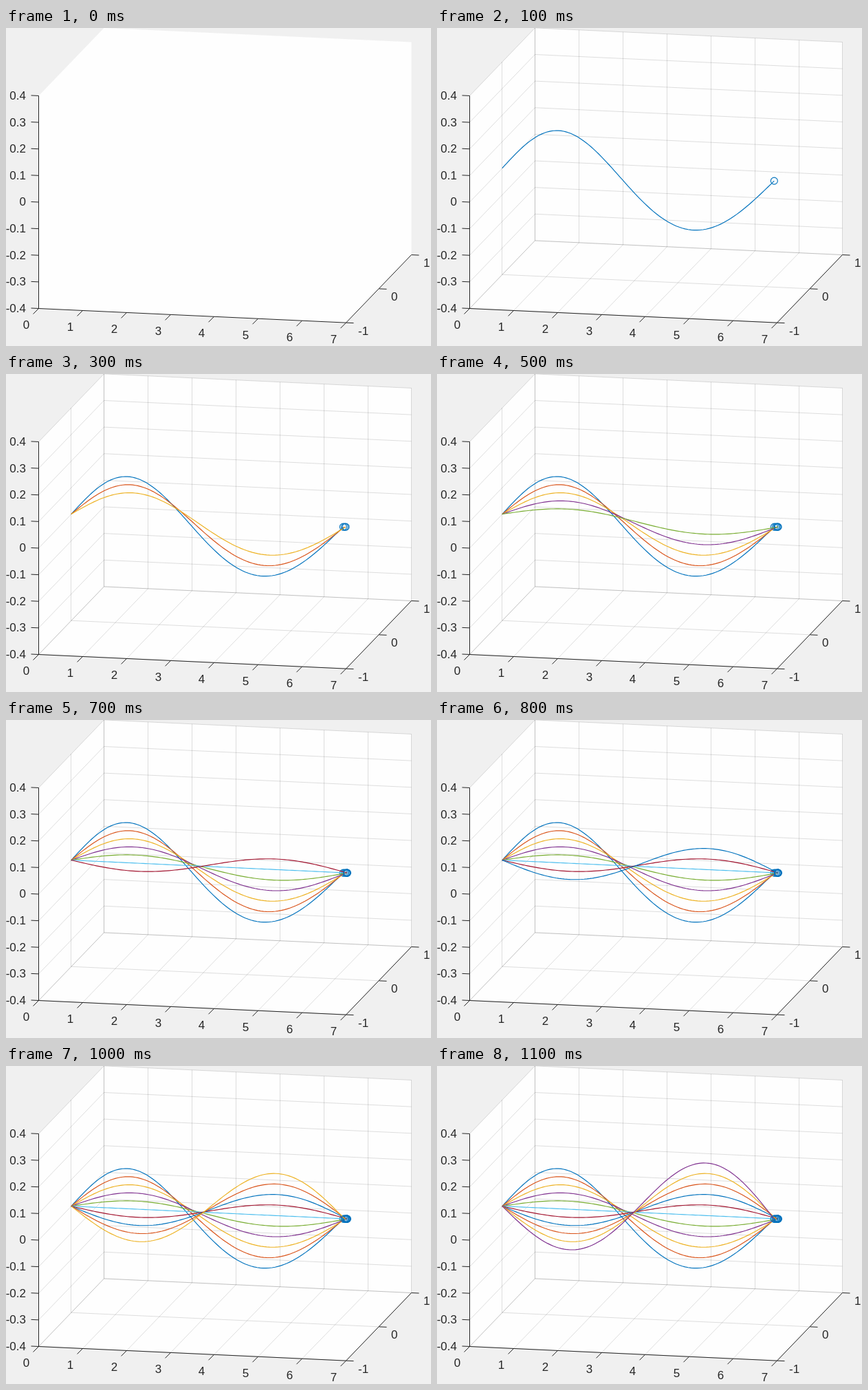
Recreate the animation shown at these times as an HTML page with a canvas. Size 618x462 px, loop 1200 ms.

```html
<!DOCTYPE html>
<html lang="en">
<head>
<meta charset="utf-8">
<title>Vibrating string</title>
<style>
html, body { margin: 0; width: 100%; height: 100%; overflow: hidden; background: #f0f0f0; }
canvas { display: block; }
</style>
</head>
<body>
<canvas id="stage" width="618" height="462"></canvas>
<script>
const ctx = document.getElementById('stage').getContext('2d');
const LOOP = 1200, STEP = 100;
const INK = '#262626', GRID = 'rgba(38,38,38,0.15)', MARKER = '#0072bd';
const COLORS = ['#0072bd', '#d95319', '#edb120', '#7e2f8e', '#77ac30', '#4dbeee', '#a2142f'];
const XS = [0, 1, 2, 3, 4, 5, 6, 7], YS = [-1, 0, 1];
const ZS = [4, 3, 2, 1, 0, -1, -2, -3, -4].map(n => n / 10);

// Orthographic view of the axes box; columns snap to whole pixels.
function project(x, y, z) {
  return [
    Math.round(46.85 + 63.9 * x + 47.64 * (y + 1)),
    407 + 2.95 * x - 49.3 * (y + 1) - 386.3 * (z + 0.4)
  ];
}

function path(points, color, width = 1) {
  ctx.beginPath();
  points.forEach(p => ctx.lineTo(...p));
  ctx.strokeStyle = color;
  ctx.lineWidth = width;
  ctx.stroke();
}

function drawBox() {
  const corners = [[0, -1, 0.4], [0, 1, 0.4], [7, 1, 0.4], [7, 1, -0.4], [7, -1, -0.4], [0, -1, -0.4]];
  ctx.beginPath();
  corners.forEach(c => ctx.lineTo(...project(...c)));
  ctx.fillStyle = '#fefefe';
  ctx.fill();
}

function drawGrid() {
  const line = (a, b) => path([project(...a), project(...b)], GRID);
  for (const x of XS) {
    line([x, 1, -0.4], [x, 1, 0.4]);
    line([x, -1, -0.4], [x, 1, -0.4]);
  }
  for (const y of YS) {
    line([0, y, -0.4], [0, y, 0.4]);
    line([0, y, -0.4], [7, y, -0.4]);
  }
  for (const z of ZS) {
    line([0, 1, z], [7, 1, z]);
    line([0, -1, z], [0, 1, z]);
  }
}

function tick([x, y], dx, dy, text, tx, ty, align) {
  path([[x, y], [x + dx, y + dy]], INK);
  ctx.textAlign = align;
  ctx.fillStyle = INK;
  ctx.fillText(text, x + tx, Math.round(y + ty) - 0.5);
}

function drawAxes() {
  path([[0, -1, 0.4], [0, -1, -0.4], [7, -1, -0.4], [7, 1, -0.4]].map(p => project(...p)), INK);
  for (const x of XS) tick(project(x, -1, -0.4), -8, 8, x, -18, 30, 'center');
  for (const y of YS) tick(project(7, y, -0.4), 11, 0.5, y, 17.5, 18, 'left');
  for (const z of ZS) tick(project(0, -1, z), -11, -0.5, z, -18.5, 6, 'right');
}

// String shape for amplitude a; the free end pulls in as the amplitude grows.
function stringPoint(s, a) {
  const sway = a * Math.sin(s / 2);
  const pull = a * a * (6 * s / (2 * Math.PI) + 6.8 * Math.sin(s / 2));
  return [
    94.3 + 63.9 * s - 12 * sway - pull,
    203.1 + 2.95 * s + 12.3 * sway - 67.5 * a * Math.sin(s)
  ];
}

function drawString(i) {
  const a = 1 - i / 5, points = [];
  for (let k = 0; k <= 100; k++) points.push(stringPoint(k / 100 * 2 * Math.PI, a));
  path(points, COLORS[i % COLORS.length], 1.15);
  ctx.beginPath();
  ctx.arc(...points[100], 5, 0, 2 * Math.PI);
  ctx.strokeStyle = MARKER;
  ctx.stroke();
}

function draw() {
  const count = Math.floor(performance.now() % LOOP / STEP);
  ctx.setTransform(1, 0, 0, 1, 0, 0);
  ctx.fillStyle = '#f0f0f0';
  ctx.fillRect(0, 0, 618, 462);
  ctx.translate(0.5, 0.5);
  ctx.font = '17px "Liberation Sans", Arial, sans-serif';
  drawBox();
  if (count > 0) drawGrid();
  drawAxes();
  for (let i = 0; i < count; i++) drawString(i);
  requestAnimationFrame(draw);
}
draw();
</script>
</body>
</html>
```
